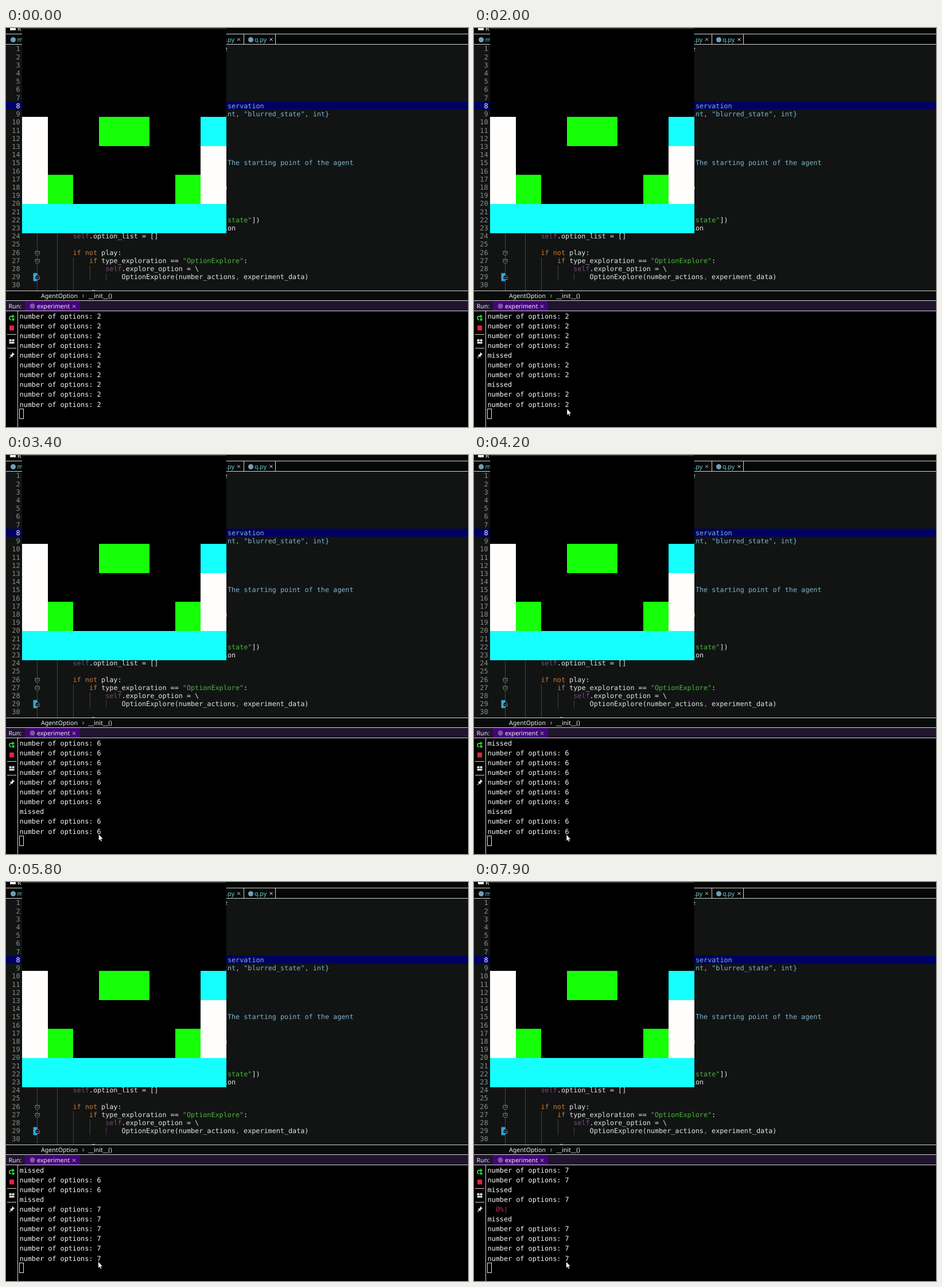
These frames come from a looping animation (805 by 696 pixels, 8 s). An HTML page:

```html
<!DOCTYPE html>
<html lang="en">
<head>
<meta charset="utf-8">
<title>Agent run</title>
<style>
  html, body { margin: 0; width: 100%; height: 100%; overflow: hidden; background: #000; }
  svg { display: block; width: 805px; height: 696px; }
  text { white-space: pre; text-rendering: geometricPrecision; }
  .code { font: 11.78px "DejaVu Sans Mono", monospace; fill: #e4e6e4; }
  .term { font: 11.8px "DejaVu Sans Mono", monospace; fill: #f8f8f8; }
  .ui { font: 10.6px "Noto Sans", "Open Sans", sans-serif; fill: #f0f0f0; }
  .tab { fill: #6fd3d8; }
  .num { fill: #8c8f8a; text-anchor: end; }
  .doc { fill: #80b4cc; }
  .str { fill: #4db53c; }
  .kw { fill: #cc7a35; }
  .self { fill: #7d4a80; }
  .bar { fill: #c4304c; }
  .rule { stroke: #d4d4d4; fill: none; }
  .guide { stroke: #424542; fill: none; }
  .fold { stroke: #8a8d8a; fill: #111413; }
  .x { stroke: #d8d8d8; fill: none; }
</style>
</head>
<body>
<svg viewBox="0 0 805 696" xmlns="http://www.w3.org/2000/svg">
  <!-- editor -->
  <rect width="805" height="459" fill="#111413"/>
  <rect width="805" height="28" fill="#050706"/>
  <rect y="128.5" width="805" height="14" fill="#000064"/>
  <path class="rule" d="M0 10.5H805M0 28.5H805M414.5 11V28M469.5 11V28"/>
  <rect x="7" width="10" height="4" fill="#eee"/>
  <text class="ui" x="20" y="4.5">R</text>
  <circle cx="12.5" cy="20.5" r="4.5" fill="#6f9fb8"/>
  <circle cx="426.5" cy="20.5" r="4.5" fill="#6f9fb8"/>
  <text class="ui tab" x="19.5" y="23.8">m</text>
  <text class="ui tab" x="383.5" y="23.8">.py</text>
  <text class="ui tab" x="433" y="23.8">q.py</text>
  <path class="x" d="M403 17.5l5 5m0-5l-5 5M459.5 17.5l5 5m0-5l-5 5"/>

  <path class="guide" d="M54.5 357V458M89.5 357V458M117.5 400V458M146.5 414V441M174.5 428V441"/>
  <rect x="47.5" y="427.5" width="7" height="14" fill="#2fa9e2"/>
  <path class="fold" d="M51 389.5h7v5l-3.5 3l-3.5-3zM51 403.5h7v5l-3.5 3l-3.5-3zM51 438.5h7v-5l-3.5-3l-3.5 3z"/>
  <path class="fold" d="M53 392.5h3M53 406.5h3M53 435.5h3"/>
  <g id="code"></g>

  <!-- game window -->
  <rect x="28" width="355.6" height="357.6"/>
  <rect x="28" width="355.6" height="1.5" fill="#343634"/>
  <g id="game" shape-rendering="crispEdges"></g>

  <!-- breadcrumb and run bar -->
  <rect y="459" width="805" height="237"/>
  <rect y="459" width="805" height="17" fill="#0a0c0b"/>
  <path d="M150 457.5h5" stroke="#888"/>
  <rect y="476" width="805" height="18" fill="#21142f"/>
  <rect x="33" y="476" width="96" height="18" fill="#43047a"/>
  <path class="rule" d="M0 458.5H805M0 475.5H805M0 493.5H805M20.5 494V696"/>
  <text class="ui" x="61" y="470.6">AgentOption</text>
  <path class="x" d="M133.5 465l2 2.5l-2 2.5"/>
  <text class="ui" x="143.6" y="470.6">__init__()</text>
  <text class="ui" x="4.5" y="488.6">Run:</text>
  <circle cx="46" cy="485" r="4.5" fill="#7b5a96"/>
  <text class="ui" x="54" y="488.6">experiment</text>
  <path class="x" d="M116 483l5 5m0-5l-5 5"/>

  <!-- run tool strip -->
  <path d="M13 503H9a3 3 0 0 0 0 6" fill="none" stroke="#2fd23c" stroke-width="1.8"/>
  <path d="M11 499.5l4 3.5l-4 3.5zM10.5 506.5h4v4h-4z" fill="#2fd23c"/>
  <rect x="6" y="519" width="8" height="8.5" fill="#e5233d"/>
  <path class="rule" d="M2 534.5H18M2 558.5H18"/>
  <path d="M5.5 543h4v3.5h-4zM10.5 543h4v3.5h-4zM5.5 547.5h9v3h-9z" fill="#e8e8e8"/>
  <path d="M10.5 565l4.5 4.5l-1.5 .5l-2 2v2.5l-2-1.5l-3.5 3l-.5-.5l3-3.5l-2-2h2.5l2-2z" fill="#f0f0f0"/>

  <!-- console -->
  <g id="term"></g>
  <rect x="23.5" y="664.5" width="7" height="17" fill="none" stroke="#e8e8e8"/>
  <path id="mouse" d="M0 0V11.5L2.5 9.3L4.2 13L6 12.2L4.4 8.6H7.8Z" fill="#fff" stroke="#000" stroke-width=".6"/>
</svg>
<script>
const LOOP = 8000, TICK = 100;
const $ = id => document.getElementById(id);

function add(parent, tag, attrs, content = '') {
  const el = document.createElementNS('http://www.w3.org/2000/svg', tag);
  for (const k in attrs) el.setAttribute(k, attrs[k]);
  el.textContent = content;
  return parent.appendChild(el);
}

// Code: line number, column, then [class, text] runs
const lineY = n => 40.4 + (n - 1) * 14.21, colX = c => 59.8 + c * 7.09;
const code = [
  [1, 45, ['', 'e']],
  [8, 46, ['doc', 'servation']],
  [9, 45, ['doc', 'int, "blurred_state", int}']],
  [15, 46, ['doc', 'The starting point of the agent']],
  [18, 45, ['kw', 'n']],
  [22, 46, ['str', 'state"'], ['', '])']],
  [23, 45, ['', 'ion']],
  [24, 8, ['self', 'self'], ['', '.option_list = []']],
  [26, 8, ['kw', 'if not '], ['', 'play:']],
  [27, 12, ['kw', 'if '], ['', 'type_exploration == '], ['str', '"OptionExplore"'], ['', ':']],
  [28, 16, ['self', 'self'], ['', '.explore_option = \\']],
  [29, 20, ['', 'OptionExplore(number_actions'], ['kw', ', '], ['', 'experiment_data)']],
];
for (let n = 1; n <= 30; n++) {
  const el = add($('code'), 'text', { class: 'code num', x: 24.5, y: lineY(n) }, n);
  if (n === 8) el.style.fill = '#fff';
}
for (const [n, col, ...runs] of code) {
  const row = add($('code'), 'text', { class: 'code', x: colX(col), y: lineY(n) });
  for (const [cls, str] of runs) add(row, 'tspan', { class: cls }, str);
}

// Game grid
const fills = { w: '#fffefd', g: '#16ff08', c: '#16ffff', k: '#000' };
function cell(col, row, kind) {
  const x = Math.round(28.4 + col * 44.4), y = Math.round(154.8 + row * 50.7);
  const right = Math.round(28.4 + (col + 1) * 44.4), bottom = Math.round(154.8 + (row + 1) * 50.7);
  return add($('game'), 'rect', { x, y, width: right - x, height: bottom - y, fill: fills[kind] });
}
['w  gg  c', 'w      w', 'wg    gw', 'cccccccc'].forEach((line, row) =>
  [...line].forEach((kind, col) => kind !== ' ' && cell(col, row, kind)));

// Cells that show only during [from, to) spans
const flashes = [
  [cell(7, 0, 'w'), [[100, 200], [500, 700], [2200, 2300]]],
  [cell(6, 1, 'g'), [[3000, 3100], [7100, 7500]]],
  [cell(4, 0, 'k'), [[3900, 4000]]],
  [cell(5, 2, 'g'), [[4900, 5000]]],
];

// Console output in bursts: start, ms between lines, one letter per line
const bursts = [
  [0, 0, '2222222222'], [1100, 180, 'm22m22'], [2400, 200, 'o2'], [2900, 50, 'P6666666m66'],
  [3700, 0, '666'], [3900, 16, 'm666666'], [4200, 0, 'm66'], [4400, 50, 'm77'],
  [4900, 50, '777'], [5400, 1400, '77'], [7000, 12, 'P777m77m7'], [7400, 0, '777'],
  [7500, 57, 'm7Pm7777'],
];
const log = bursts.flatMap(([start, gap, kinds]) =>
  [...kinds].map((kind, i) => ({ kind, time: start + i * gap })));
const ROWS = 10;
const rows = Array.from({ length: ROWS }, (_, i) =>
  add($('term'), 'text', { x: 23.5, y: 507 + i * 17.06 }));

function lineText({ kind, time }, t) {
  if (kind === 'm') return 'missed';
  if (kind === 'o') return 'option terminated correctly';
  if (kind !== 'P') return 'number of options: ' + kind;
  return '  0%|' + (t - time < 200 ? '          | 9/30000 [00:12<2:23:12, 3.47it/s]' : '');
}

// Pointer: time, x, y; it slows down towards each point
const path = [[700, 577, 688], [1400, 207, 661], [2000, 162, 664], [2800, 162, 660], [4200, 161, 662], [LOOP, 160.5, 662]];
function pointerAt(t) {
  const i = path.findIndex(p => p[0] > t);
  const [t0, x0, y0] = path[i - 1], [t1, x1, y1] = path[i];
  const e = 1 - (1 - (t - t0) / (t1 - t0)) ** 1.6;
  return `translate(${x0 + (x1 - x0) * e} ${y0 + (y1 - y0) * e})`;
}

function draw(t) {
  const shown = log.filter(line => line.time <= t).slice(-ROWS);
  rows.forEach((row, i) => {
    row.textContent = lineText(shown[i], t);
    row.setAttribute('class', shown[i].kind === 'P' ? 'term bar' : 'term');
  });
  for (const [el, spans] of flashes) {
    el.style.display = spans.some(([from, to]) => t >= from && t < to) ? '' : 'none';
  }
  const visible = t >= path[0][0];
  $('mouse').style.display = visible ? '' : 'none';
  if (visible) $('mouse').setAttribute('transform', pointerAt(t));
}

const start = performance.now();
function tick() {
  const t = (performance.now() - start) % LOOP;
  draw(Math.floor(t / TICK) * TICK);
  requestAnimationFrame(tick);
}
tick();
</script>
</body>
</html>
```
